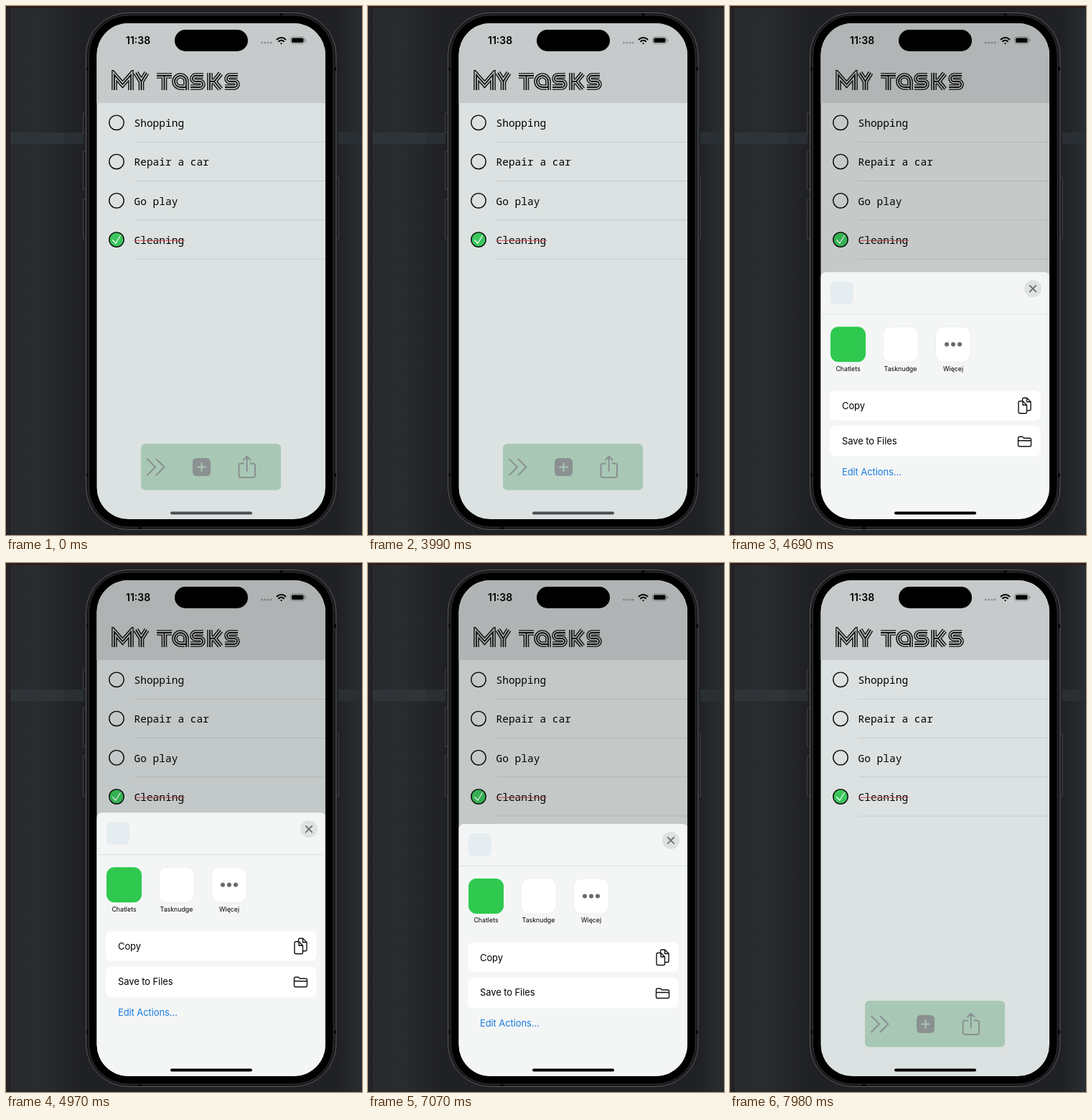
Write an HTML page that moves like this. It is 496x736 px and loops after 8000 ms.

```html
<!DOCTYPE html>
<html lang="en">
<head>
<meta charset="utf-8">
<title>My tasks</title>
<style>
  html, body { margin: 0; width: 100%; height: 100%; overflow: hidden; background: #25282c; }
  svg { display: block; font-family: Inter, sans-serif; }
  .task { font: 500 14.5px "Noto Sans Mono", monospace; }
  .line { fill: none; stroke-linecap: round; stroke-linejoin: round; }
  .action { font-size: 13px; letter-spacing: -.1px; }
  .label { font-size: 8.8px; text-anchor: middle; }
</style>
</head>
<body>
<svg width="496" height="736" viewBox="0 0 496 736">
  <defs>
    <linearGradient id="wall">
      <stop offset="0" stop-color="#282a2e"/>
      <stop offset=".1" stop-color="#282b2f"/>
      <stop offset=".21" stop-color="#202125"/>
      <stop offset=".93" stop-color="#202125"/>
      <stop offset="1" stop-color="#292d31"/>
    </linearGradient>
    <clipPath id="screen"><rect x="126.5" y="24" width="318.5" height="690" rx="44"/></clipPath>
    <clipPath id="titleBox"><path d="M140 89H340V117H140Z"/></clipPath>
    <path id="title" d="M151 118V96L162.500 109L174 96V118M181 93L188.500 105L196 93M188.500 103V117
      M210 97H231M220.500 97V117M251 117V105a8 8 0 1 0-8 8h8
      M275 97H264a4 4 0 0 0 0 8h6a4 4 0 0 1 0 8H257
      M284 93V117M285 105h5L299 94M290 105L299 116
      M323 97H312a4 4 0 0 0 0 8h6a4 4 0 0 1 0 8H305"/>
  </defs>

  <!-- desktop -->
  <rect width="496" height="736" fill="url(#wall)"/>
  <path d="M6 176H80V192H6Z" fill="#2e3438"/>
  <path d="M80 176H108V192H80ZM463 176H496V192H463Z" fill="#2a2f33"/>
  <path d="M0 0H5V736H0Z" fill="#262328"/>
  <path d="M5.500 3V736" stroke="#19191c"/>
  <path d="M0 0H496V3H0Z" fill="#2a1f1d"/>

  <!-- phone body -->
  <path d="M107.500 149h5v27h-5zM107.500 202h5v53h-5zM107.500 269h5v55h-5zM459 238h4.500v86h-4.500z" fill="#1f1f21" stroke="#414143"/>
  <rect x="111.500" y="9.500" width="348.500" height="719" rx="59" fill="#1b1b1d" stroke="#59595b"/>
  <rect x="115.500" y="13" width="340.500" height="712" rx="55" fill="#000" stroke="#303032"/>
  <path d="M381 10h5v3h-5zM184 725h5v3h-5zM112 85h3v5h-3zM112 650h3v5h-3zM457 85h3v5h-3zM457 650h3v5h-3z" fill="#08080a"/>

  <g clip-path="url(#screen)">
    <path d="M126 24H446V714H126Z" fill="#dce2e1"/>
    <path d="M126 24H446V135H126Z" fill="#c6caca"/>

    <text x="167" y="53" font-size="14" font-weight="600">11:38</text>
    <path d="M356.500 51h13" stroke="#8f9494" stroke-width="3" stroke-linecap="round" stroke-dasharray="0 4.200"/>
    <g class="line" stroke="#000" stroke-width="2">
      <path d="M377.500 46.500a8.500 8.500 0 0 1 12 0M380 49.300a5 5 0 0 1 7 0"/>
      <path d="M383.500 52v.3"/>
    </g>
    <rect x="396.500" y="43" width="19.500" height="9.500" rx="3" fill="none" stroke="#858a8a"/>
    <rect x="398" y="44.500" width="16.500" height="6.500" rx="1.800"/>
    <path d="M417.500 46v3.500" stroke="#858a8a" stroke-width="1.400"/>

    <g clip-path="url(#titleBox)" fill="none">
      <use href="#title" stroke="#111" stroke-width="7.600"/>
      <use href="#title" stroke="#c6caca" stroke-width="4.800"/>
      <use href="#title" stroke="#111" stroke-width="1.800"/>
    </g>

    <g id="tasks"></g>

    <!-- toolbar -->
    <rect x="188" y="609" width="195" height="64.500" rx="6" fill="#a8c8b5"/>
    <rect x="260" y="629" width="25" height="25" rx="5.500" fill="#8b9091"/>
    <path class="line" d="M272.500 636v11M267 641.500h11" stroke="#a8c8b5" stroke-width="2"/>
    <path class="line" d="M197 630.500l11 11l-11 11M209.500 630.500l11 11l-11 11
      M331 636.500h-3.500a3 3 0 0 0-3 3v13.500a3 3 0 0 0 3 3h16.500a3 3 0 0 0 3-3v-13.500a3 3 0 0 0-3-3h-3.500
      M335.700 647v-20M331 631.500l4.700-4.700l4.700 4.700" stroke="#8b9091" stroke-width="2"/>

    <path id="dim" d="M126 24H446V714H126Z" opacity="0"/>

    <!-- share sheet, its top edge at y = 0 -->
    <g id="sheet">
      <rect x="126" width="320" height="420" rx="8" fill="#f4f6f5"/>
      <rect x="139.500" y="13" width="32.500" height="32" rx="7" fill="#e6edf1"/>
      <circle cx="422" cy="23" r="12" fill="#dfe2e2"/>
      <path class="line" d="M417.700 18.700l8.600 8.600m0-8.600l-8.600 8.600" stroke="#65696a" stroke-width="1.700"/>
      <path d="M126 58.500H446" stroke="#dfe2e2"/>

      <rect x="140" y="76" width="49" height="49" rx="11" fill="#2fc94f"/>
      <rect x="213" y="76" width="49.500" height="49" rx="11" fill="#fff" stroke="#eceeee"/>
      <rect x="286.500" y="76" width="49" height="49" rx="11" fill="#fff" stroke="#eceeee"/>
      <path d="M302 100.500h19" stroke="#68696b" stroke-width="6" stroke-linecap="round" stroke-dasharray="0 9"/>
      <text class="label" x="164.500" y="137.500">Chatlets</text>
      <text class="label" x="237.500" y="137.500">Tasknudge</text>
      <text class="label" x="311" y="137.500">Więcej</text>

      <rect x="139" y="165" width="293.500" height="41.500" rx="8" fill="#fff"/>
      <rect x="139" y="214" width="293.500" height="42.500" rx="8" fill="#fff"/>
      <text class="action" x="156" y="191">Copy</text>
      <text class="action" x="156" y="239.500">Save to Files</text>
      <text class="action" x="156" y="282.500" fill="#1a7be0">Edit Actions…</text>
      <g class="line" stroke="#111" stroke-width="1.400">
        <path d="M407.500 179v-2a2 2 0 0 1 2-2h4l5.500 5.500v10a2 2 0 0 1-2 2h-2.500M413.500 175v5.500h5.500
          M404 179.500h4l5.500 5.500v9.500a2 2 0 0 1-2 2h-7.500a2 2 0 0 1-2-2v-13a2 2 0 0 1 2-2M408 179.500v5.500h5.500"/>
        <path d="M401.500 240.500v-9.500a2 2 0 0 1 2-2h4l2 2h8a2 2 0 0 1 2 2v7.500a2 2 0 0 1-2 2h-14a2 2 0 0 1-2-2M401.500 234.500h18"/>
      </g>
    </g>

    <rect x="235" y="33" width="102" height="30" rx="15"/>
    <rect id="home" x="229" y="703.500" width="114" height="4" rx="2"/>
  </g>
</svg>
<script>
const $ = id => document.getElementById(id);

$("tasks").innerHTML = ["Shopping", "Repair a car", "Go play", "Cleaning"].map((name, i) => {
  const done = name === "Cleaning";
  return `<g transform="translate(0 ${i * 54.25})">
    <circle cx="154" cy="162.300" r="10.200" fill="${done ? "#3cc65d" : "none"}" stroke="#0a0a0a" stroke-width="1.400"/>
    <text class="task" x="178.500" y="168">${name}</text>
    <path d="M179 189.300H446" stroke="#c7cccc"/>
    ${done ? `<path class="line" d="M148.800 163l4 4.500l6.500-10.500" stroke="#fff" stroke-width="1.200"/>
    <path d="M179 163.500H249" stroke="#d0444c" stroke-width="1.200"/>` : ""}
  </g>`;
}).join("");

const LOOP = 8000, STEP = 70, OPEN = 4446, CLOSE = 7052;
const SHEET_TOP = 347, SCREEN_BOTTOM = 714;

// Critically damped spring, falling from 1 to 0.
function spring(ms) {
  const u = Math.max(0, ms) * 0.01826;
  return (1 + u) * Math.exp(-u);
}

function draw(now) {
  const t = Math.floor(now % LOOP / STEP) * STEP;
  const shown = t < CLOSE ? 1 - spring(t - OPEN) : spring(t - CLOSE);
  const top = SCREEN_BOTTOM - shown * (SCREEN_BOTTOM - SHEET_TOP);
  $("sheet").setAttribute("transform", `translate(0 ${top.toFixed(2)})`);
  $("dim").setAttribute("opacity", 0.115 * shown);
  $("home").setAttribute("fill", t < 4200 ? "#4a5051" : "#000");
  requestAnimationFrame(draw);
}
requestAnimationFrame(draw);
</script>
</body>
</html>
```
